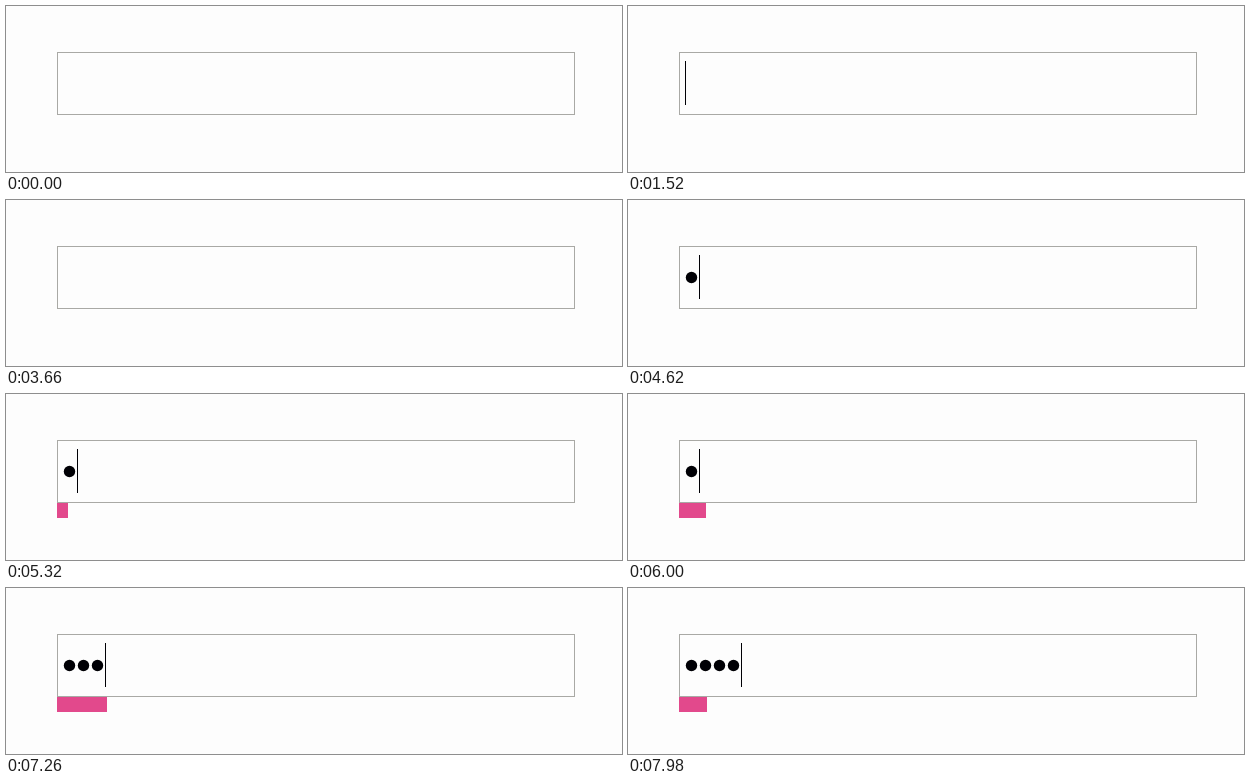
An HTML page with a canvas that plays this animation: 616x166 px, repeating every 8 s.

```html
<!DOCTYPE html>
<html lang="en">
<head>
<meta charset="utf-8">
<title>Password strength meter</title>
<style>
  html, body { margin: 0; width: 100%; height: 100%; overflow: hidden; background: #fdfdfd; }
  canvas { display: block; }
</style>
</head>
<body>
<canvas id="stage" width="616" height="166"></canvas>
<script>
const ctx = document.getElementById('stage').getContext('2d');
const LOOP = 8000;
const field = { x: 51, y: 46, w: 518, h: 63 };
const dotPitch = 14;

const caretToggles = [420, 2040, 3680];
const keyPresses = [4400, 6150, 6960, 7720];
const barMoves = [
  { at: 5100, to: 27 },
  { at: 6850, to: 52 },
  { at: 7545, to: 27 }
];
const barDuration = 500;

const countBefore = (times, t) => times.filter(time => time <= t).length;

const swing = p => 0.5 - Math.cos(Math.PI * Math.min(1, Math.max(0, p))) / 2;

function barWidth(t) {
  return barMoves.reduce(
    (width, move) => width + (move.to - width) * swing((t - move.at) / barDuration), 0);
}

function draw(t) {
  ctx.fillStyle = '#fdfdfd';
  ctx.fillRect(0, 0, 616, 166);

  ctx.strokeStyle = '#a9a9a5';
  ctx.lineWidth = 1;
  ctx.strokeRect(field.x + 0.5, field.y + 0.5, field.w - 1, field.h - 1);

  ctx.fillStyle = '#e2498c';
  ctx.fillRect(field.x, field.y + field.h, Math.round(barWidth(t)), 15);

  const typed = countBefore(keyPresses, t);
  ctx.fillStyle = '#000005';
  for (let i = 0; i < typed; i++) {
    ctx.beginPath();
    ctx.arc(63.5 + i * dotPitch, 77.5, 5.7, 0, Math.PI * 2);
    ctx.fill();
  }

  if (countBefore(caretToggles, t) % 2) {
    ctx.fillRect(57 + typed * dotPitch, 55, 1, 44);
  }
}

function tick() {
  draw(performance.now() % LOOP);
  requestAnimationFrame(tick);
}
tick();
</script>
</body>
</html>
```
